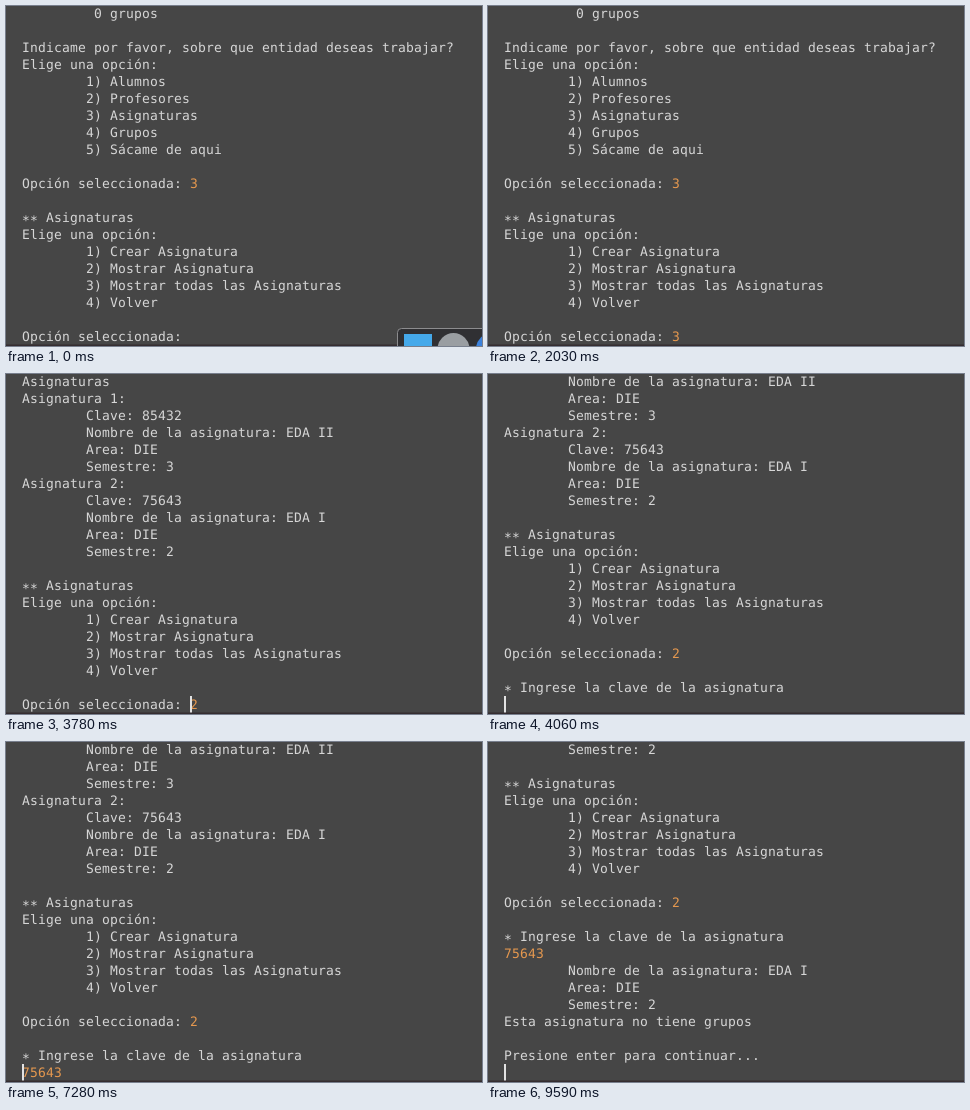
Animation, 476 px wide and 340 px high, one loop 9940 ms. Source, as an HTML page:

```html
<!DOCTYPE html>
<html lang="es">
<head>
<meta charset="utf-8">
<title>Consola de asignaturas</title>
<style>
  html, body { margin: 0; width: 100%; height: 100%; overflow: hidden; background: #464646; }
  svg { display: block; width: 476px; height: 340px; }
  text {
    font: 13px "DejaVu Sans Mono", "Liberation Mono", monospace;
    letter-spacing: 0.174px;
    white-space: pre;
    text-rendering: geometricPrecision;
    fill: #d6d6d6;
  }
  .input { fill: #e5984f; }
</style>
</head>
<body>
<svg viewBox="0 0 476 340">
  <rect width="476" height="340" fill="#464646"/>
  <g id="rows"></g>
  <rect id="caret" y="322" width="2" height="17" fill="#e2e2e2"/>
  <rect y="338.5" width="476" height="1.5" fill="#352d30"/>
  <g id="dock">
    <rect x="391.5" y="322.5" width="120" height="60" rx="4" fill="#303033" stroke="#8c8c8e"/>
    <rect x="398" y="328" width="28" height="28" fill="#45a9ea"/>
    <circle cx="447.500" cy="343" r="16" fill="#9a9ea2"/>
    <circle cx="486" cy="343" r="16" fill="#3c82dc"/>
  </g>
</svg>
<script>
const LOOP = 9940, ROWS = 20, LINE = 17, LEFT = 16, CHAR = 8;
const PROMPT = "Opción seleccionada: ";
const TAB = " ".repeat(8);

const options = (...names) => names.map((name, i) => `${TAB}${i + 1}) ${name}`);
const details = (name, term) =>
  [`Nombre de la asignatura: ${name}`, "Area: DIE", `Semestre: ${term}`].map(s => TAB + s);
const subject = (n, key, name, term) =>
  [`Asignatura ${n}:`, `${TAB}Clave: ${key}`, ...details(name, term)];
const menu = [
  "", "** Asignaturas", "Elige una opción:",
  ...options("Crear Asignatura", "Mostrar Asignatura", "Mostrar todas las Asignaturas", "Volver"),
  ""
];

// Everything after "|" was typed by the user.
const log = [
  TAB + " 0 grupos", "",
  "Indicame por favor, sobre que entidad deseas trabajar?", "Elige una opción:",
  ...options("Alumnos", "Profesores", "Asignaturas", "Grupos", "Sácame de aqui"),
  "", PROMPT + "|3",
  ...menu, PROMPT + "|3",
  "", "Asignaturas",
  ...subject(1, 85432, "EDA II", 3),
  ...subject(2, 75643, "EDA I", 2),
  ...menu, PROMPT + "|2",
  "", "* Ingrese la clave de la asignatura", "|75643",
  ...details("EDA I", 2),
  "Esta asignatura no tiene grupos", "", "Presione enter para continuar..."
];

// [start ms, first visible line, last row, caret column or -1]
const steps = [
  [0, 0, PROMPT, -1],
  [840, 0, PROMPT, 21],
  [1330, 0, PROMPT, -1],
  [1470, 0, PROMPT + "|3", 22],
  [1960, 0, PROMPT + "|3", -1],
  [2170, 0, PROMPT + "|3", 21],
  [2240, 21, "", 0],
  [2310, 21, PROMPT, 0],
  [2520, 21, PROMPT, 21],
  [3010, 21, PROMPT, -1],
  [3360, 21, PROMPT + "|2", 22],
  [3780, 21, PROMPT + "|2", 21],
  [4060, 24, "", 0],
  [4480, 24, "", -1],
  [4830, 24, "|7", 1],
  [5040, 24, "|75", 2],
  [5320, 24, "|756", 3],
  [5810, 24, "|756", -1],
  [6230, 24, "|7564", 4],
  [6510, 24, "|75643", 5],
  [7000, 24, "|75643", -1],
  [7280, 24, "|75643", 0],
  [7560, 31, "", 0],
  [8050, 31, "", -1],
  [8540, 31, "", 0],
  [9030, 31, "", -1],
  [9590, 31, "", 0]
];

const byId = id => document.getElementById(id);
const make = (tag, attrs, parent) => {
  const el = document.createElementNS("http://www.w3.org/2000/svg", tag);
  for (const key in attrs) el.setAttribute(key, attrs[key]);
  return parent.appendChild(el);
};

const caret = byId("caret"), dock = byId("dock");
const rows = Array.from({ length: ROWS }, (_, i) =>
  make("text", { x: LEFT, y: 12 + i * LINE }, byId("rows")));

function setRow(row, line) {
  row.textContent = "";
  const [output, input = ""] = line.split("|");
  const stars = output.match(/^\**/)[0];
  // Asterisks sit at mid height.
  if (stars) make("tspan", { dy: 2.5 }, row).textContent = stars;
  make("tspan", { dy: stars ? -2.5 : 0 }, row).textContent = output.slice(stars.length);
  make("tspan", { class: "input" }, row).textContent = input;
}

let shown = null;
function render(t) {
  const drop = Math.floor(t / 70);
  dock.setAttribute("transform", `translate(0 ${Math.min(drop, 3) * 6})`);
  dock.setAttribute("visibility", drop < 3 ? "visible" : "hidden");

  const step = steps.filter(s => s[0] <= t).pop();
  if (step === shown) return;
  shown = step;
  const [, top, last, column] = step;
  rows.forEach((row, i) => setRow(row, i < ROWS - 1 ? log[top + i] : last));
  caret.setAttribute("x", LEFT + column * CHAR);
  caret.setAttribute("visibility", column < 0 ? "hidden" : "visible");
}

const start = performance.now();
function tick() {
  render((performance.now() - start) % LOOP);
  requestAnimationFrame(tick);
}
tick();
</script>
</body>
</html>
```
